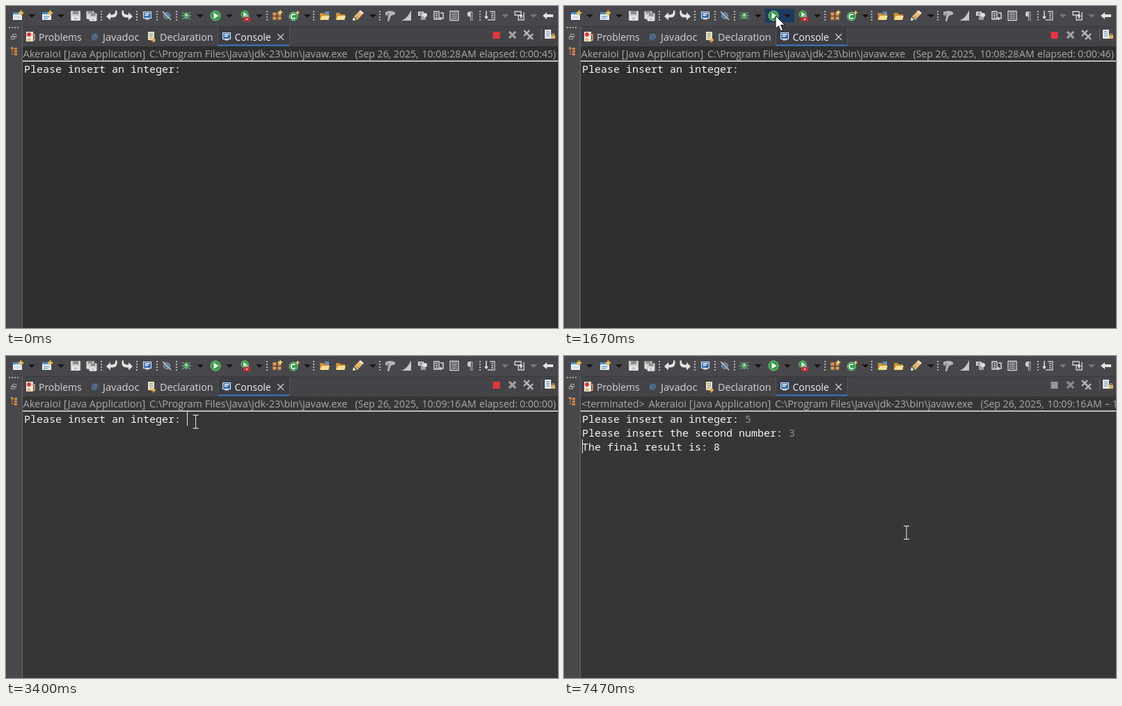
An HTML page that plays this animation: 793 by 463 pixels, repeating every 8000 ms.

```html
<!DOCTYPE html>
<html lang="en">
<head>
<meta charset="utf-8">
<title>Console run</title>
<style>
html, body { margin: 0; width: 100%; height: 100%; overflow: hidden; background: #48484c; }
svg { display: block; width: 100%; height: 100%; }
text { white-space: pre; font-family: "Open Sans", "Noto Sans", sans-serif; }
.mono { font: 15px "Noto Sans Mono", "Liberation Mono", monospace; fill: #f4f4f4; }
.input { fill: #84979c; }
</style>
</head>
<body>
<svg id="stage" viewBox="0 0 793 463" xmlns="http://www.w3.org/2000/svg"></svg>
<script>
const LOOP = 8000;
const STEP = 200 / 3;

const rect = (x, y, w, h, fill, extra = '') =>
  `<rect x="${x}" y="${y}" width="${w}" height="${h}" fill="${fill}" ${extra}/>`;
const disc = (x, y, r, fill, extra = '') =>
  `<circle cx="${x}" cy="${y}" r="${r}" fill="${fill}" ${extra}/>`;
const fill = (d, color) => `<path d="${d}" fill="${color}"/>`;
const line = (d, color, w = 1, extra = '') =>
  `<path d="${d}" fill="none" stroke="${color}" stroke-width="${w}" ${extra}/>`;
const text = (x, y, size, color, str, id = '') =>
  `<text x="${x}" y="${y}" font-size="${size}" fill="${color}" ${id && `id="${id}"`}>${str}</text>`;
const at = (x, y, body) => `<g transform="translate(${x} ${y})">${body}</g>`;
const group = (id, body) => `<g id="${id}">${body}</g>`;

// Icons, each drawn around its own centre
const arrowDown = (x, color = '#161618') => fill(`M${x - 5} 12h10l-5 5z`, color);
const dots = x => line(`M${x} 7v15`, '#b4b4b8', 2, 'stroke-dasharray="2 2"');
const cross = (x, y, r, color, w) =>
  line(`M${x - r} ${y - r}l${2 * r} ${2 * r}m0 ${-2 * r}l${-2 * r} ${2 * r}`, color, w);

const newFile = rect(-7, -5, 13, 11, '#eef3f5') + rect(-7, -5, 13, 3, '#4d8fc4') +
  rect(-5, 0, 9, 4, '#cfe0ea') + line('M4.5 -7.5v7M1 -4h7', '#f0c24a', 2.4);
const newType = newFile + line('M-5 1h8M-5 4h6', '#4d8fc4', 1.2);
const floppy = rect(-7, -7, 14, 14, '#d0d0d0', 'rx="1"') + rect(-4, -7, 8, 5, '#8d8d90') +
  rect(-5, 1, 10, 6, '#f0f0f0') + line('M-3 3h6M-3 5h6', '#9a9a9c');
const floppies = at(-2, -1, `<g transform="scale(.8)">${floppy}</g>`) +
  at(2, 2, `<g transform="scale(.8)">${floppy}</g>`);
const undo = fill('M-8 1l6 -6v3.5h3q5 -1 4 -6h2.5q1.5 10 -6.5 10h-3v4z', '#e4e4e4');
const redo = `<g transform="scale(-1 1)">${undo}</g>`;
const monitor = rect(-6, -6, 12, 10, '#dce9f7') + rect(-5, -5, 10, 8, '#3469a8') +
  line('M-3.5 -3h7M-3.5 -.5h5', '#fff', 1.3) + rect(-3, 4, 6, 1.5, '#c5d0da');
const skip = disc(0, 0, 4.5, '#587690', 'stroke="#91a5b5"') +
  line('M-6 -6l12 12', '#c4ccd2', 1.5);
const bug = line('M-6 -5l4 3M6 -5l-4 3M-7 0h14M-6 5l4 -3M6 5l-4 -3', '#6d9c93', 1.3) +
  `<ellipse rx="3.5" ry="5" fill="#58a466"/>` + disc(0, -1, 1.7, '#c5e4a9');
const play = disc(0, 0, 7, '#2f9e43', 'stroke="#8ed095"') + fill('M-2.5 -4.5l7 4.5l-7 4.5z', '#fff');
const playTool = at(-1, -2, `<g transform="scale(.75)">${play}</g>`) +
  rect(-3, 2, 10, 6, '#c62f37') + line('M0 2v-2h4v2', '#d8d8d8') + rect(1, 4, 2, 2, '#f3dede');
const pack = [[-6, -5], [1, -5], [-6, 1], [1, 1]]
  .map(([x, y]) => rect(x, y, 5.5, 5, '#d39a63', 'stroke="#7b5130" stroke-width=".8"')).join('') +
  line('M5 -8v6M2 -5h6', '#f4d273', 1.8);
const classC = disc(-1, 1, 6, '#2f9a4a', 'stroke="#8fd09c"') +
  line('M1.5 -1a3.2 3.2 0 1 0 0 4', '#fff', 1.8) + line('M5 -7v5M2.5 -4.5h5', '#f4d273', 1.6);
const folder = fill('M-7 -4h5l2 2h6v8h-13z', '#c99136') + fill('M-7 6l3 -6h11l-2 6z', '#f7dd93');
const folderNew = folder + rect(0, -6, 6, 4, '#5f8ec7');
const marker = fill('M-8 7l1 -5l4 4z', '#f6f0d6') + fill('M-6 1l8 -8l5 4l-8 9z', '#e8b877') +
  fill('M1 -6l2 -2l5 4l-2 2z', '#f7e7cf') + line('M-3 0l4 4', '#a97335');
const funnel = fill('M-7 -5q7 -4 14 0v3l-6 2l-3 8h-2l1 -8l-4 -1z', '#b4b4b6') +
  disc(-3, -2, 1.5, '#77777a');
const wedge = fill('M-7 7q9 -3 14 -15v15z', '#c8c8ca');
const nodes = rect(-6, -6, 8, 6, '#d5d5d7') + rect(-2, 0, 7, 6, '#a2a2a5') +
  disc(4, -1, 3, '#e2e2e4') + line('M-4 -4h4M-4 -2h4', '#606064');
const pages = line('M-6 -6h7v11h-7zM-4 -3h3M-4 0h3M-4 3h3', '#dcdcde', 1.4) +
  line('M3 -4h4v8h-5m2 -2l-2 2l2 2', '#dcdcde', 1.5);
const sheet = line('M-6 -6.5h12v13h-12z', '#d8d8da', 1.3) +
  line('M-4 -4h8M-4 -1.5h8M-4 1h8M-4 3.5h8', '#d8d8da', 1);
const stepDown = line('M-6 -7v11m-2 -3l2 3l2 -3', '#e0e0e2', 1.5) +
  line('M-1 -6h7v12h-10M1 -3h3M1 0h3M1 3h3', '#cacacc', 1.3);
const stepUp = line('M-7 -6h9v5h-9zM-2 -1v7h8v-11', '#d2d2d4', 1.4) +
  line('M2 4v-5m-2 2l2 -2l2 2', '#eee', 1.5);
const back = fill('M-8 0l6 -5v3h9v4h-9v3z', '#e4e4e6');

const toolIcons = [
  [17, newFile], [59, newType], [100, floppy], [123, floppies], [152, undo], [174, redo],
  [203, monitor], [231, skip], [259, bug], [301, play], [344, playTool], [389, pack],
  [414, classC], [458, folderNew], [481, folder], [506, marker], [552, funnel], [575, wedge],
  [598, nodes], [621, pages], [644, sheet], [696, stepDown], [738, stepUp], [779, back]
];

const toolbar =
  [137, 188, 217, 245, 375, 442, 537, 681].map(dots).join('') +
  [37, 79, 279, 321, 364, 433, 527].map(x => arrowDown(x)).join('') +
  arrowDown(717, '#77777b') + arrowDown(758, '#77777b') +
  toolIcons.map(([x, icon]) => at(x, 14, icon)).join('') +
  text(662, 19, 15, '#d0d0d2', '¶');

const gutter =
  line('M4 31h15', '#aaaaad', 2, 'stroke-dasharray="2 2"') +
  line('M9.5 40.5h5v4h-5zM7.500 43.500h5v4h-5z', '#a8a8ab') +
  line('M9 60v10M9 62h4M9 69h4', '#b8753c', 1.2) +
  [60, 64, 68].map(y => rect(12, y, 4, 3, '#d4874a')).join('') + rect(7, 59, 3, 3, '#d4874a');

const problems = rect(-6, -7, 10, 14, '#f2e9e4') + disc(-2, -3, 3, '#d4393f') +
  fill('M-5 6l3 -5l3 5z', '#e5b44b') + line('M2 -3h4v8h-3', '#d9a67e', 1.5);
const declaration = rect(-5, -7, 9, 12, '#efe2bd') + line('M-3 -4h5M-3 -1h5M-3 2h3', '#4c83bb') +
  line('M-1 5h6m-3 -3l3 3l-3 3', '#e8b84a', 1.8);

const tabs =
  rect(24, 29, 769, 29, '#444448') + rect(24, 29, 769, 1, '#3a3a3d') +
  rect(304, 30, 104, 28, '#3c3d42') + line('M304.5 30v27M407.500 30v27', '#56565b') +
  rect(305, 55.5, 102, 2, '#3b78c3') +
  at(35, 44, problems) + text(122.5, 48, 11, '#68aef0', '@') +
  at(209, 44, declaration) + at(317, 44, monitor) +
  text(47, 50, 13.95, '#d6d6d6', 'Problems') + text(139, 50, 14.7, '#d6d6d6', 'Javadoc') +
  text(221, 50, 14.35, '#d6d6d6', 'Declaration') + text(328.5, 50, 13.95, '#f4f4f4', 'Console') +
  cross(394.5, 44.5, 4.5, '#d0d0d0', 1.2) +
  rect(699.5, 37, 10, 10, '#e5353d', 'id="stop"') +
  group('remove', cross(727.5, 41.500, 4.7, '#a2a2a4', 3.2)) +
  cross(748, 39, 4, '#b8b8ba', 2.4) + cross(753, 44, 4, '#b8b8ba', 2.4) +
  line('M769.500 33v17', '#67676b') +
  at(780, 41, rect(-6, -7, 9, 13, '#e3e8ec') + line('M-4 -4h5M-4 -1h5M-4 2h5', '#5685b4') +
    rect(3, 1, 6, 5, '#d6b265') + line('M4.500 1v-2h3v2', '#d6b265'));

const GREY = '#a9a9a9';
const status =
  text(25, 74, 14.3, GREY, '&lt;terminated&gt;', 'ended') +
  group('info',
    text(24.5, 74, 14.5, GREY, 'Akeraioi [Java Application]') +
    text(206, 74, 14.4, GREY, 'C:\\Program Files\\Java\\jdk-23\\bin\\javaw.exe') +
    text(501.5, 74, 14.1, GREY, '(Sep 26, 2025,') +
    text(597.5, 74, 14.1, GREY, '', 'clock') + text(654, 74, 14.1, GREY, 'AM') +
    text(680, 74, 14.1, GREY, '', 'tail') + text(738, 74, 14.1, GREY, '', 'elapsed'));

const rows = [0, 1, 2].map(i =>
  `<text class="mono" x="26" y="${96 + 20 * i}"><tspan id="out${i}"></tspan>` +
  `<tspan class="input" id="in${i}"></tspan></text>`).join('');

const arrow = `<path d="M0 0v18.500l4.300 -4l3 7.500l3.300 -1.400l-3.100 -7.300h6z" fill="#fff" stroke="#111" stroke-width="1"/>`;
const beamPath = 'M-4 -9.500h3q1 0 1 1v17q0 1 -1 1h-3M4 -9.500h-3q-1 0 -1 1v17q0 1 1 1h3';
const beam = line(beamPath, '#1b1b1b', 2.6) + line(beamPath, '#d8d8d8', 1.3);

document.getElementById('stage').innerHTML =
  rect(0, 0, 793, 463, '#48484c') + rect(23, 29, 1, 434, '#68686c') +
  rect(24, 58, 769, 405, '#2f2f2f', 'id="pane"') +
  rect(289, 4, 42, 20, '#1d3b5e', 'id="hover"') +
  toolbar + gutter + tabs + status + rect(24, 78.500, 769, 1.500, '#e6e6e0') + rows +
  rect(0, 80, 1, 20, '#f0f0f0', 'id="caret"') +
  group('busy', disc(321, 13.500, 7, 'none', 'stroke="#2e73c2" stroke-width="5"') +
    disc(321, 13.500, 7, 'none', 'stroke="#5aa0e4" stroke-width="1.500" stroke-dasharray="14 30"')) +
  group('arrow', arrow) + group('beam', beam);

const ui = {};
document.querySelectorAll('[id]').forEach(el => ui[el.id] = el);
const show = (el, on) => el.setAttribute('visibility', on ? 'visible' : 'hidden');
const put = (el, str) => { if (el.textContent !== str) el.textContent = str; };

// Pointer path: time, x, y
const path = [
  [330, 778, 398], [530, 640, 290], [730, 455, 148], [930, 335, 54], [1130, 300, 24],
  [1200, 300, 23], [1670, 304, 14], [3065, 304, 14], [3200, 285, 54], [3330, 273, 92],
  [3400, 272.5, 94.5], [3470, 278, 98], [3600, 410, 190], [3730, 492, 254]
];
function pointer(t) {
  t = Math.floor((t + 4) / STEP) * STEP;
  const i = path.findIndex(p => p[0] > t);
  if (i < 0) return path[path.length - 1].slice(1);
  const [t0, x0, y0] = path[Math.max(i - 1, 0)], [t1, x1, y1] = path[i];
  const k = i ? (t - t0) / (t1 - t0) : 0;
  return [x0 + (x1 - x0) * k, y0 + (y1 - y0) * k];
}

// Caret: start, end, column, row
const carets = [
  [2470, 3070, 0, 0], [3400, 3930, 26, 0], [4470, 4870, 26, 0], [4870, 5130, 27, 0],
  [5130, 5670, 0, 1], [6070, 6400, 34, 1], [6400, 6930, 0, 2], [7470, 8000, 0, 2]
];

function draw(t) {
  const during = (a, b) => t >= a && t < b;
  const restarted = t >= 2400, ended = t >= 6470;
  const seconds = restarted
    ? [3600, 4600, 5600].filter(s => t >= s).length
    : 45 + [1000, 2000].filter(s => t >= s).length;

  ui.pane.setAttribute('fill', t < 2600 ? '#2f2f2f' : '#363636');
  put(ui.clock, restarted ? '10:09:16' : '10:08:28');
  put(ui.tail, ended ? '– 10:09:20 AM)' : 'elapsed:');
  put(ui.elapsed, ended ? '' : `0:00:${String(seconds).padStart(2, '0')})`);
  show(ui.ended, ended);
  ui.info.setAttribute('transform', `translate(${ended ? 97 : 0} 0)`);
  ui.stop.setAttribute('fill', ended ? '#98989a' : '#e5353d');
  ui.remove.setAttribute('opacity', ended ? .75 : 1);

  put(ui.out0, during(2600, 2800) ? '' : 'Please insert an integer: ');
  put(ui.in0, t >= 4870 ? '5' : '');
  put(ui.out1, t >= 5130 ? 'Please insert the second number: ' : '');
  put(ui.in1, t >= 6070 ? '3' : '');
  put(ui.out2, t >= 6400 ? 'The final result is: 8' : '');

  const caret = carets.find(c => during(c[0], c[1]));
  show(ui.caret, caret);
  if (caret) {
    ui.caret.setAttribute('x', 26 + 9 * caret[2]);
    ui.caret.setAttribute('y', 80 + 20 * caret[3]);
  }

  const [x, y] = pointer(t);
  const visible = t >= 330 && !during(4870, 5670) && !during(6070, 6470);
  const inText = y > 80;
  for (const [el, on] of [[ui.arrow, !inText], [ui.beam, inText]]) {
    show(el, visible && on);
    el.setAttribute('transform', `translate(${x} ${y})`);
  }
  show(ui.hover, during(1200, 3130));
  show(ui.busy, during(2200, 2600));
}

function tick() {
  draw(performance.now() % LOOP);
  requestAnimationFrame(tick);
}
tick();
</script>
</body>
</html>
```
